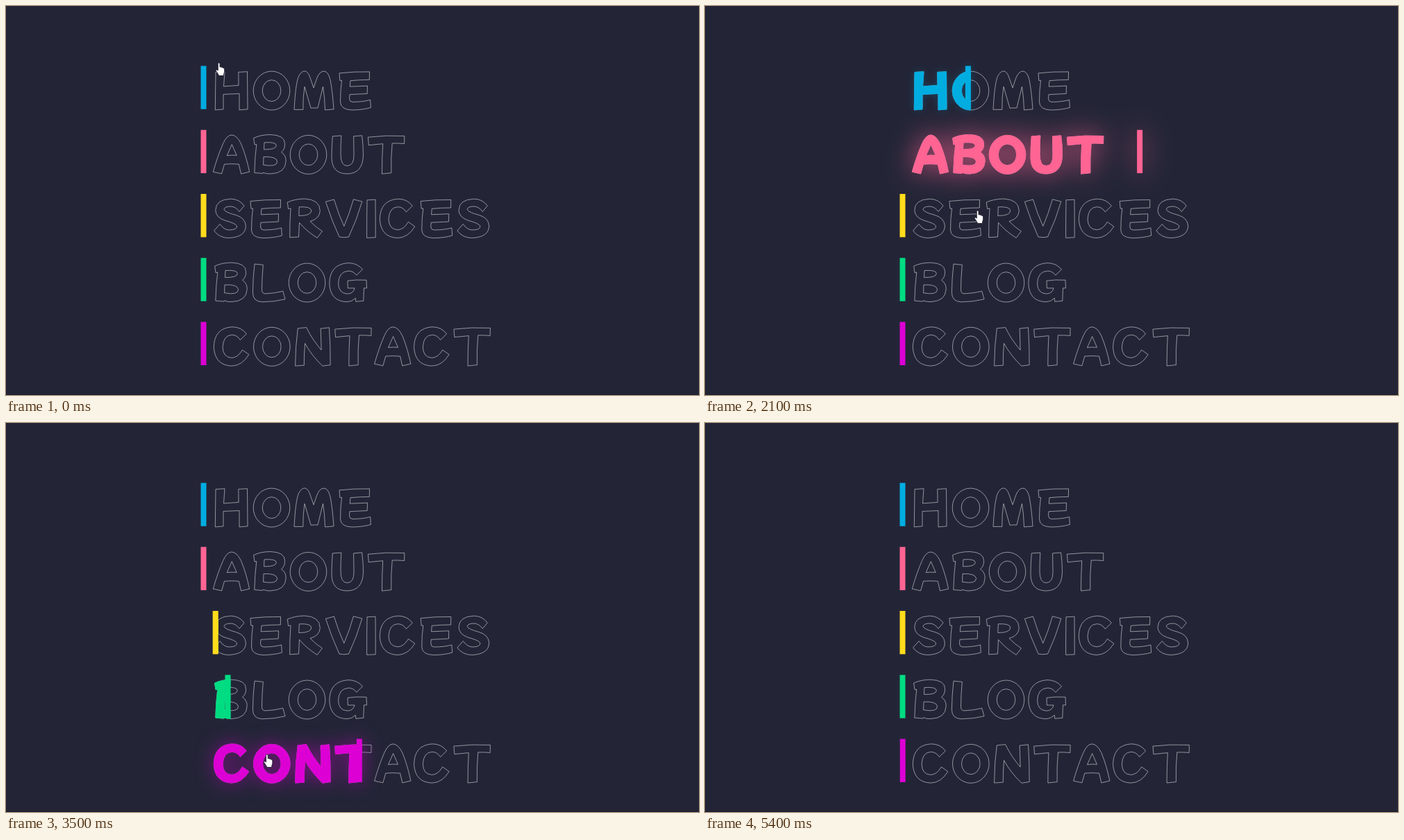
Write an HTML page that moves like this. It is 998x561 px and loops after 5.7 s.

```html
<!DOCTYPE html>
<html lang="en">
<head>
<meta charset="utf-8">
<title>Menu hover</title>
<style>
  html, body { margin: 0; width: 100%; height: 100%; overflow: hidden; background: #232537; }
  svg { display: block; width: 998px; height: 561px; }
  .letters { fill-rule: evenodd; stroke-width: 1; }
  .outline { fill: none; stroke: rgba(255, 255, 255, .5); }
  #cursor path { fill: #fff; stroke: #1a1b28; stroke-width: .8; }
</style>
</head>
<body>
<svg id="stage" viewBox="0 0 998 561">
  <g id="menu"></g>
  <rect y="560" width="998" height="1" fill="#191a28"/>
  <g id="cursor">
    <path id="hand" d="M3.3 1.5Q3.3 0 4.6 0Q6 0 6 1.5V6Q7.6 5.3 8.4 6.6Q10 6 10.6 7.4Q12.6 7 12.6 9V13Q11.5 15.5 11.3 18.5H4.8Q2.5 14 0 11Q.5 8.8 3.3 11Z"/>
    <path id="arrow" d="M0 0V14L3.2 11 5.4 16 7.6 15 5.4 10.2H9.8Z"/>
  </g>
</svg>
<script>
// Hand-lettered alphabet: advance width and outline of each letter.
const glyphs = {
  A: [56, 'M1.3 60.5Q8 37 15.5 20Q21 7.4 28 7.3Q35.5 7.5 41.5 20Q49 38 53.6 60.5L41.5 63.3 38.3 49.5Q28 48.5 17.5 49.5L13.6 63.2ZM21.2 37L28.3 21 35.2 36.7Q28 36 21.2 37Z'],
  B: [54, 'M3.6 11.8Q14 6.8 28 6.8Q48.5 7.5 48.6 20Q48.6 28.5 43.5 32Q50.3 36.5 50.2 45Q49.5 62.5 28 63.3Q21 63.5 17.5 61.5L16.8 62.8 4.8 61.8Q5.3 40 7.8 20.8L5 21.2ZM19 18.2Q18.6 23 18.6 28.2Q36 28.5 36.3 22.5Q36 17 19 18.2ZM18 38.8L17.6 50.5Q37.5 54 37.6 45.5Q36.5 38 18 38.8Z'],
  C: [57.3, 'M49.3 17.3Q42 7.2 28.5 7.2Q2.5 9 2.3 37Q4 62.5 28 63.5Q43 63.2 52.8 47L43.4 40.4Q37 51.5 28 51.8Q15.5 51 15 36.5Q16 19 28.5 18.7Q36 19 40.3 26Z'],
  E: [54, 'M4 10.5Q25 8 47.5 8.5L47.3 20Q33 20 20 21.3L19.3 29.8 44.5 28.8 44.2 40 19 41.3Q18.5 45 18.6 48Q19 51.8 23 52Q38 52 48.6 49L49.4 60Q38 63.5 22 63.6Q6 63 5.5 52Q5.5 35 7.5 21L4.8 21Z'],
  G: [58, 'M51.5 16.5Q43.5 7.3 31 7.3Q4 9 3.8 37Q5 62.8 29 63.4Q36 63.4 41.3 58L41.8 63 52.8 62 53.5 43.5 57.5 43.5 57 32Q42 31 30 33L30.3 43.6 40 43.6Q38 51.8 29.5 51.8Q17 51 16.6 37Q17 19.5 31.5 18.8Q38 18.8 42.8 25Z'],
  H: [57, 'M5 9.1L18 8.3 16.5 29.5 38 28 37.8 9 50.5 8.3 51 62.5 39 63.5 39 40 16 41 16 62.5 4.3 63.5Z'],
  I: [21, 'M5 8.8L17 8.2Q17.2 35 17.2 62.8L4.6 63.3Q4.5 35 5 8.8Z'],
  L: [54, 'M7 8.8L19.3 10Q17.5 30 17.5 46Q17.5 51.8 23 51.6Q36 51 47.8 48L51 59.5Q36 63.3 18 63.5Q4.5 63 4.4 50Q4.5 30 7 8.8Z'],
  M: [65, 'M4 63C5 48 6 28 10 16Q14 7.5 19 7.5Q24 8 27 17L32 31.5 37 17Q41 7.5 47 7.7Q53 8 56 20Q59 35 61 62.5L48.5 63.5Q48 45 45.5 30L38 60.5 28 60.8 19 30Q16.5 45 16.8 63Z'],
  N: [60, 'M9 9.3L21.3 8Q30 26 42.8 40.5Q42.5 25 41.8 9.6L54.2 8.2Q56 35 55.8 62L44.5 63.6Q28.5 48 19.3 31Q17.8 46 18 62.6L5.3 63.4Q5.5 35 9 9.3Z'],
  O: [57, 'M2.2 35.7a26.3 28 0 1 1 52.6 0a26.3 28 0 1 1-52.6 0ZM15.2 35.7a13.3 15.4 0 1 0 26.6 0a13.3 15.4 0 1 0-26.6 0Z'],
  R: [57, 'M3.3 12Q14 7.3 28 7Q50 8 50.3 24.5Q49.5 36 36 39.5Q44 48 53.4 53.8L46.2 63.4Q31 54 20.5 41.5L19.5 62 6.7 62.8Q6.5 40 8 21L4.5 21.5ZM20.3 18.8L19.8 31.5Q37.5 31.5 37.8 24Q37 18 20.3 18.8Z'],
  S: [51, 'M46 17.2Q39 7.3 26.5 7.2Q5 8 4.8 23.5Q5 33.5 18 38.2Q32.5 42 35.5 46Q36.5 51.8 24.5 52Q17 52 11 43.5L2.6 53Q10 63.3 23.5 63.5Q48 62.5 48.4 46Q47.5 34.5 34 30.5Q18.5 26.5 17 22.5Q17.5 18 27 18Q34 18.5 39 25.5Z'],
  T: [58, 'M2.4 10.5Q28 7.3 54.8 8.8L54.6 19.8Q45 19 37.2 19.3Q35.2 40 35.8 62L22.5 63.4Q22.5 40 23.7 20L3.3 22Z'],
  U: [55, 'M6.3 9.2L18.8 8.3Q18 22 18 35Q18 51.8 27.3 51.8Q37.2 51.5 37 36L36.6 9.2 48.6 8.2Q50.5 22 50.5 36Q50 63.2 27 63.3Q5.3 63 5 40Q5 24 6.3 9.2Z'],
  V: [56, 'M1.4 11.3L13.4 8Q20 30 27.8 46.5Q35.8 28 41.4 7.8L53.8 11Q46 38 34.5 62Q27.5 63.5 21 62Q9.5 37 1.4 11.3Z']
};

const LOOP = 5700, STEP = 100, FADE = 1000;
const LEFT = 280.5, TOP = 86.4, PITCH = 92.3, INDENT = 16.5, TRAVEL = 437, BAR = 8;

const items = [
  { word: 'HOME', color: '#00ade1', enter: 630, leave: 1618 },
  { word: 'ABOUT', color: '#ff6493', enter: 1620, leave: 2330 },
  { word: 'SERVICES', color: '#ffdd1c', enter: 2320, leave: 2876 },
  { word: 'BLOG', color: '#00dc82', enter: 2886, leave: 3200 },
  { word: 'CONTACT', color: '#dc00d4', enter: 3200, leave: 4430 }
];

// Pointer track: time, x, y
const track = [
  [200, 302, 82], [700, 321, 120], [1400, 341, 196], [2100, 388, 295], [2600, 463, 430],
  [3200, 478, 463], [3700, 300, 488], [3900, 258, 498], [4300, 233, 528], [4400, 234, 562]
];

const byId = id => document.getElementById(id);

function lettering(word) {
  let x = INDENT;
  return [...word].map(char => {
    const [advance, d] = glyphs[char];
    const path = `<path transform="translate(${x})" d="${d}"/>`;
    x += advance;
    return path;
  }).join('');
}

byId('menu').innerHTML = items.map(({ word, color }, i) => {
  const letters = lettering(word);
  return `<g transform="translate(${LEFT} ${TOP + i * PITCH})" role="img" aria-label="${word}">
    <clipPath id="clip${i}"><rect id="reveal${i}" height="70"/></clipPath>
    <g class="letters outline">${letters}</g>
    <g id="glow${i}" fill="${color}">
      <g class="letters" stroke="${color}" clip-path="url(#clip${i})">${letters}</g>
      <rect id="bar${i}" width="${BAR}" height="62.4"/>
    </g>
  </g>`;
}).join('');

// CSS "ease": cubic-bezier(.25, .1, .25, 1)
function ease(x) {
  if (x <= 0) return 0;
  if (x >= 1) return 1;
  const curve = (a, b, u) => 3 * a * u * (1 - u) ** 2 + 3 * b * u * u * (1 - u) + u ** 3;
  let low = 0, high = 1;
  for (let i = 0; i < 24; i++) {
    const mid = (low + high) / 2;
    if (curve(.25, .25, mid) < x) low = mid; else high = mid;
  }
  return curve(.1, 1, low);
}

// An interrupted hover runs back in proportionally less time.
function hoverAmount({ enter, leave }, t) {
  const amount = ease((Math.min(t, leave) - enter) / FADE);
  return t <= leave ? amount : amount * (1 - ease((t - leave) / (FADE * amount)));
}

function pointerAt(t) {
  if (t <= track[0][0]) return track[0].slice(1);
  const next = track.findIndex(key => key[0] >= t);
  if (next < 0) return null;
  const [t0, x0, y0] = track[next - 1], [t1, x1, y1] = track[next];
  const k = (t - t0) / (t1 - t0);
  return [x0 + (x1 - x0) * k, y0 + (y1 - y0) * k];
}

function draw(t) {
  items.forEach((item, i) => {
    const amount = hoverAmount(item, t), x = amount * TRAVEL;
    byId('bar' + i).setAttribute('x', x);
    byId('reveal' + i).setAttribute('width', amount ? x + BAR : 0);
    byId('glow' + i).style.filter = amount > .002
      ? `drop-shadow(0 0 ${25 * amount}px color-mix(in srgb, ${item.color} ${100 * amount}%, transparent))`
      : 'none';
  });
  const pointer = pointerAt(t);
  byId('cursor').style.display = pointer ? '' : 'none';
  if (!pointer) return;
  const outside = pointer[0] < LEFT;
  byId('cursor').setAttribute('transform', `translate(${pointer})`);
  byId('hand').style.display = outside ? 'none' : '';
  byId('arrow').style.display = outside ? '' : 'none';
}

const start = performance.now();
function tick() {
  const t = (performance.now() - start) % LOOP;
  draw(Math.floor(t / STEP) * STEP);
  requestAnimationFrame(tick);
}
tick();
</script>
</body>
</html>
```
